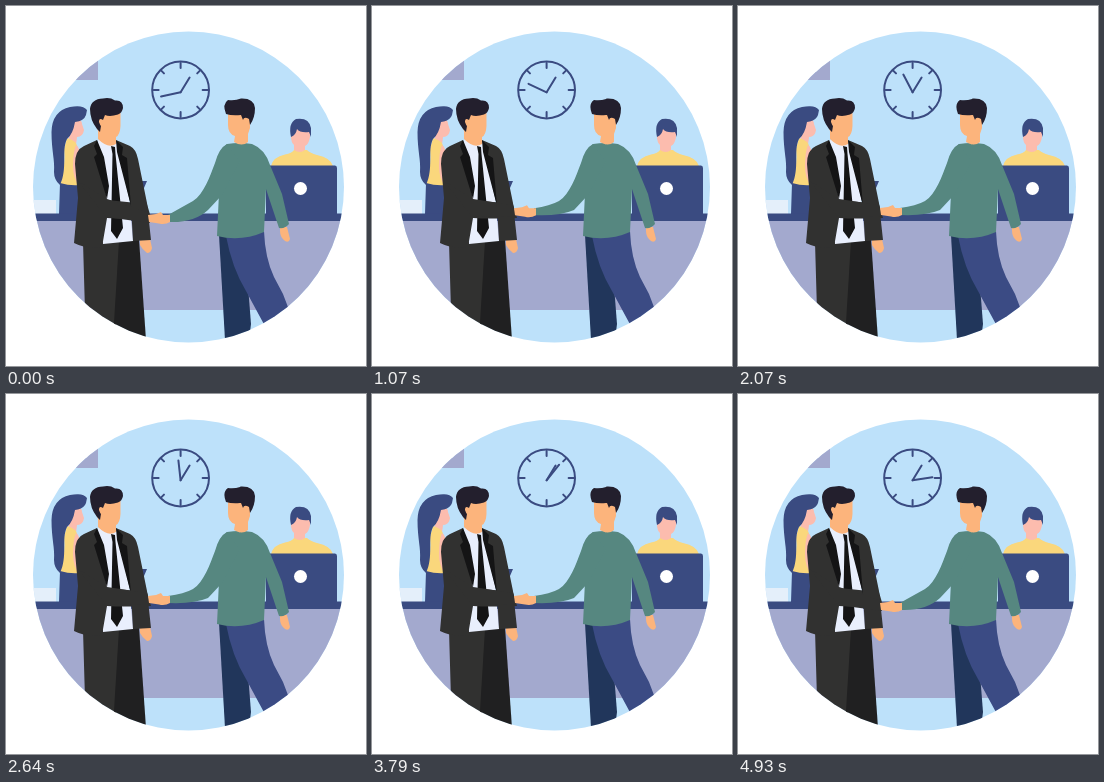
An HTML page that plays this animation: 360x360 px, repeating every 5 s.

```html
<!DOCTYPE html>
<html lang="en">
<head>
<meta charset="utf-8">
<title>Handshake at the desk</title>
<style>
  html, body { margin: 0; width: 100%; height: 100%; overflow: hidden; background: #fff; }
  svg { display: block; width: 100vw; height: 100vh; }
  .navy { fill: #3a4b81; }
  .lilac { fill: #a3a9ce; }
  .skin { fill: #fcb47c; }
  .pink { fill: #fcbcae; }
  .yellow { fill: #fad77c; }
  .hair { fill: #231f2d; }
  .suit { fill: #313130; }
  .black { fill: #141415; }
  .green { fill: #568780; }
  .clock { fill: none; stroke: #3a4b81; stroke-width: 2; stroke-linecap: round; }
</style>
</head>
<body>
<svg viewBox="0 0 360 360">
  <clipPath id="disc"><circle cx="182.5" cy="181" r="155.5"/></clipPath>
  <g clip-path="url(#disc)">
    <path fill="#bde1fa" d="M0 0H360V360H0z"/>
    <path class="lilac" d="M20 40H92V74H20z"/>

    <g class="clock" transform="translate(174.6 84)">
      <circle r="28.4"/>
      <g id="ticks"></g>
      <g transform="translate(0 2.3)">
        <path d="M0 0L9 -14.8"/>
        <path id="minute" d="M0 0V-20"/>
      </g>
    </g>

    <!-- woman at the left -->
    <path class="pink" d="M67 114Q76 112 76 118L78 124Q77 131 71 131L70 139H61z"/>
    <path class="yellow" d="M61 132Q70 134 72 142L71 180H54Q60 157 58 143z"/>
    <path class="pink" d="M70 139Q75 142 75 160L73 180Q67 172 67 160Q67 146 70 139z"/>
    <path class="navy" d="M81 104Q77 98.500 64 101Q46 105 45.500 126C45.500 145 49 154 48 166Q48 174 54 179C62 162 55 145 61 133Q67 128 69 116Q78 115 80 109z"/>
    <path class="navy" d="M54 177Q64 180 74 179V208H53z"/>

    <!-- receptionist -->
    <path class="yellow" d="M265 160Q267 151 279 148.500Q286 147 288 144H301Q304 147 311 149Q325 152 327 160z"/>
    <path class="pink" d="M285 122H304V131Q303 138 299 140V144Q294 148 288 144V139Q285 136 285 131z"/>
    <path class="navy" d="M285 131Q282 117 290 113Q303 111 305 122V131L303 126Q294 127 291 123Q290 129 285 131z"/>

    <!-- desk -->
    <path fill="#e4effa" d="M20 194H50V208H20z"/>
    <path class="navy" d="M130 175H141L138 182V208H130zM20 207.5H336V215H20z"/>
    <path class="lilac" d="M20 215H336V304H20z"/>
    <path class="navy" d="M261 159.5H329Q331 159.5 331 162V208H260V160z"/>
    <circle cx="294.5" cy="182.5" r="6.5" fill="#fff"/>

    <!-- man in the suit -->
    <path class="suit" d="M77 236H116L110 318L109 340H80z"/>
    <path fill="#202021" d="M113 235L133 233L140 334H107L109 300z"/>
    <path class="skin" d="M134 233H144L146 242Q145 247 141 247Q136 243 134 239z"/>
    <path fill="#e9effd" d="M92 134L111 136L122 180L127 235L97 238z"/>
    <path class="black" d="M105 140L109 141L109.500 148L117 222L111 233L105 225L106.500 148z"/>
    <path class="skin" d="M91 107H114.500V120Q114 129 110 131V138Q102 143 92 133V125L90 119z"/>
    <path class="hair" d="M94 126L91 123Q84 114 84 103Q85 93 97 92.500Q104 91 109 94.500Q117 93.500 117 102Q116 107 112 108.500Q104 111 99 109L97 114Q93 111 93 116Q94 119 95 120z"/>
    <path class="suit" d="M91 134L78 140Q69 144 69 158L72 192L68 237Q80 243 96 241L101 212Q118 213 145 212L141 198L101 194z"/>
    <path class="suit" d="M110 134L124 140Q130 143 132 153L141 197L145 234L127 235L125 200z"/>
    <path class="black" d="M91 134L88 140L91 148L88 151L101 193L103 180L98 151zM110 134L117 141L116 149L121 152L125 200L111 146z"/>
    <path id="sleeve" class="suit"/>

    <!-- man in the sweater -->
    <path fill="#21365b" d="M213 229H238L245 318L243 334H219z"/>
    <path fill="#3b4b84" d="M220 230L258 225Q259 252 268 271L277 288L285 309L260 322L240 285Q226 262 220 230z"/>
    <path class="skin" d="M274 221H281L284 233Q283 237 279 235Q274 231 274 225z"/>
    <path class="green" d="M221 138Q234 136 246 138Q259 143 264 159L276 188L283 218Q279 223 273 222L260 183L258 226Q235 236 211 230L214 165Q213 144 221 138z"/>
    <path id="arm" class="green"/>
    <path class="skin" d="M222 106H244V122L242 128V136Q236 141 228 136L229 130Q222 128 222 119z"/>
    <path class="hair" d="M220 108Q216 98 222 94Q229 95 235 92.500Q248 92 249 102Q249 112 244 119L243 113Q238 110 237 114L235 109Q226 110 220 108z"/>
    <path id="hands" class="skin" d="M142 -4L150 -5L155 -7L157 -4L164 -4V3Q159 6 153 4.500L143 3z"/>
  </g>
</svg>
<script>
  const LOOP = 5000, STEPS = 70;
  const $ = id => document.getElementById(id);

  $("ticks").innerHTML = Array.from({ length: 8 }, (_, i) =>
    `<path d="M0 -27V-${i % 2 ? 23.5 : 22}" transform="rotate(${i * 45})"/>`).join("");

  function draw(time) {
    const p = Math.floor(time % LOOP / LOOP * STEPS) / STEPS;
    $("minute").setAttribute("transform", `rotate(${258 + 186 * p})`);

    // the grip dips around the loop point
    const y = 206 + 7 * Math.max(0, Math.cos(2 * Math.PI * p)) ** 3;
    $("hands").setAttribute("transform", `translate(0 ${y})`);
    $("sleeve").setAttribute("d",
      `M72 175L101 193L141 ${y - 7}L144 ${y + 4}L100 211z`);
    $("arm").setAttribute("d",
      `M221 138Q213 142 209 157C204 170 198 188 187 195Q178 200 162 ${y - 4}` +
      `L163 ${y + 3}Q188 ${y + 4} 202 204L217 188L234 155z`);
  }

  const start = performance.now();
  (function tick() {
    draw(performance.now() - start);
    requestAnimationFrame(tick);
  })();
</script>
</body>
</html>
```
